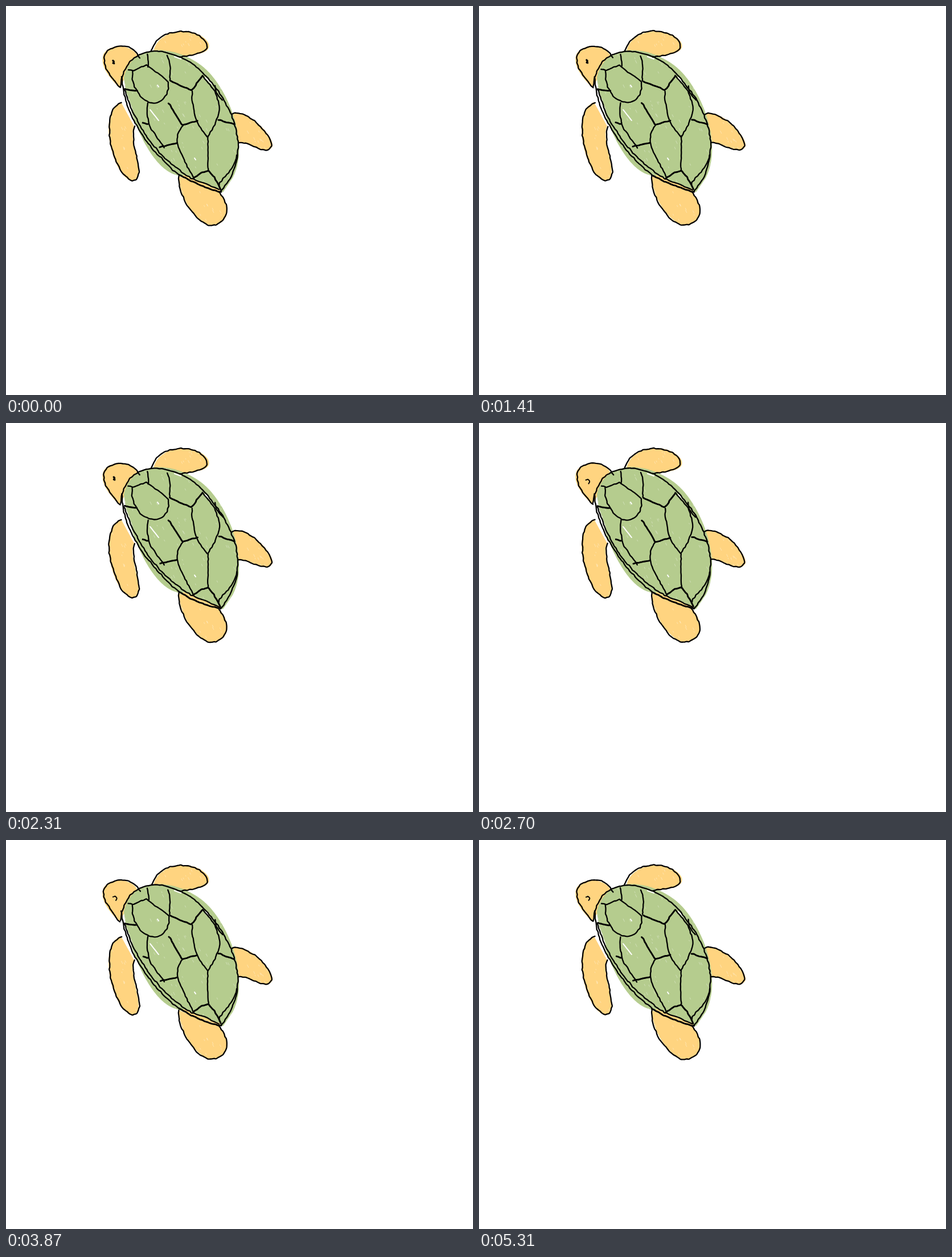
Recreate the animation shown at these times as an HTML page with a canvas. Size 820x683 px, loop 5400 ms.

```html
<!DOCTYPE html>
<html lang="en">
<head>
<meta charset="utf-8">
<title>Sea turtle</title>
<style>
html, body { margin: 0; width: 100%; height: 100%; overflow: hidden; background: #fff; }
canvas { display: block; }
</style>
</head>
<body>
<canvas id="stage" width="820" height="683"></canvas>
<script>
const ctx = document.getElementById('stage').getContext('2d');
const SKIN = '#ffd480', SHELL = '#b5cc8e', INK = '#000', PAPER = '#fff';
const LOOP = 5400, HALF = LOOP / 2, STEP = 180, SPACING = 2;

// Turns an SVG path into evenly spaced points
function curve(d) {
  const path = document.createElementNS('http://www.w3.org/2000/svg', 'path');
  path.setAttribute('d', d);
  const length = path.getTotalLength(), n = Math.ceil(length / SPACING);
  return Array.from({ length: n + 1 }, (_, i) => {
    const { x, y } = path.getPointAtLength(length * i / n);
    return [x, y];
  });
}

const head = curve('M235,91C226,66 185,65 174,84C165,104 186,128 201,143');
const frontRight = curve('M256,79C264,40 330,32 352,64C360,82 335,85 306,89');
const frontLeft = curve('M203,169C160,185 188,300 222,307C252,305 213,235 226,211');
const backRight = curve('M397,190C425,180 470,230 467,246C458,265 432,240 408,240');
const backLeft = curve('M303,299C303,343 340,385 361,385C396,382 392,345 373,327');
const shell = curve('M207,125C222,60 300,70 345,106C388,140 430,240 398,302L381,327L300,297C250,285 212,180 207,125');
const tailEdge = curve('M312,299Q340,312 374,323');

const thinLines = [
  'M200,142L203,128C218,60 300,70 347,119C390,165 440,250 377,326',
  'M203,124C205,200 270,270 303,296',
  'M208,146C228,215 270,270 327,303L374,322',
  'M405,262C400,290 380,300 373,314',
  'M249,84L250,107',
  'M215,111L222,113L247,104L286,133C288,160 270,180 244,165C226,155 220,130 222,113',
  'M284,87Q290,105 287,131',
  'M327,150C326,190 340,215 354,229C380,195 385,165 345,122',
  'M367,140L369,152L380,166',
  'M310,208Q292,235 310,265L330,302',
  'M249,170Q246,200 256,218L278,249',
  'M355,229L355,289'
].map(curve);
const boldLines = [
  'M208,146L230,150',
  'M288,132L326,148L344,123',
  'M286,170L310,208L336,202',
  'M374,199L401,209',
  'M240,204L250,207',
  'M270,247L301,241',
  'M328,303Q348,288 355,289Q368,302 376,322',
  'M303,296Q335,316 377,326'
].map(curve);
const openEye = curve('M188,95L190,97L188,99L190,100');
const shutEye = curve('M188,99L192,98L194,101L193,106');
const bareSpots = ['M211,154L222,184', 'M350,126L363,138', 'M253,182L268,201',
  'M266,139L268,142', 'M331,267L333,270', 'M296,89L307,93'].map(curve);

// Repeatable noise in -1..1, smoothed between whole numbers
function hash(n, seed) {
  const v = Math.sin(n * 127.1 + seed * 311.7) * 43758.5453;
  return (v - Math.floor(v)) * 2 - 1;
}
function noise(x, seed) {
  const i = Math.floor(x), f = x - i, u = f * f * (3 - 2 * f);
  return hash(i, seed) * (1 - u) + hash(i + 1, seed) * u;
}

function trace(points) {
  ctx.beginPath();
  for (const [x, y] of points) ctx.lineTo(x, y);
}

function stroke(points, colour, width) {
  trace(points);
  ctx.strokeStyle = colour;
  ctx.lineWidth = width;
  ctx.stroke();
}

// Crayon fill, with short slanted flecks where the paper shows through
function crayon(points, colour, dx, flecks) {
  ctx.save();
  trace(points.map(([x, y]) => [x + dx, y]));
  ctx.fillStyle = colour;
  ctx.fill();
  ctx.clip();
  const n = points.length;
  for (let i = 0; i < flecks; i++) {
    const a = points[Math.floor((hash(i, n) + 1) / 2 * n)];
    const b = points[Math.floor((hash(i, n + 1) + 1) / 2 * n)];
    const x = (a[0] + b[0]) / 2, y = (a[1] + b[1]) / 2;
    const size = 1.5 + hash(i, 3);
    stroke([[x, y], [x + size, y + size * 2]], 'rgba(255,255,255,.5)', 0.7);
  }
  ctx.restore();
}

// Fixed fine roughness plus a slow wobble that changes with each pose
function ink(points, id, pose, width) {
  const shift = (i, seed) =>
    noise(i / 2.4, seed) * 0.8 + noise(i / 14, seed + 9 + pose * 3.7) * 0.8;
  stroke(points.map(([x, y], i) => [x + shift(i, id), y + shift(i, id + 50)]), INK, width);
}

function paint() {
  crayon(head, SKIN, -2.5, 0);
  crayon(frontRight, SKIN, 3, 12);
  crayon(frontLeft, SKIN, -1, 16);
  crayon(backRight, SKIN, 1, 14);
  crayon(backLeft, SKIN, 1, 16);
  crayon(shell, SHELL, 0, 70);
  stroke(tailEdge, SKIN, 4);
  for (const spot of bareSpots) stroke(spot, PAPER, 2);
}

function draw(time) {
  const t = time % LOOP, asleep = t >= HALF, local = t % HALF;
  const pose = Math.floor((local + (asleep ? 90 : 30)) / STEP) + (asleep ? 20 : 0);
  ctx.fillStyle = PAPER;
  ctx.fillRect(0, 0, 820, 683);
  ctx.lineCap = ctx.lineJoin = 'round';
  paint();

  [head, frontRight, frontLeft, backRight, backLeft, ...thinLines]
    .forEach((line, i) => ink(line, i + 1, pose, 2.3));
  boldLines.forEach((line, i) => ink(line, i + 31, pose, 2.9));
  if (asleep) ink(shutEye, 45, pose, 1.9);
  else ink(openEye, 46, pose, 3.2);
}

const start = performance.now();
function tick() {
  draw(performance.now() - start);
  requestAnimationFrame(tick);
}
tick();
</script>
</body>
</html>
```
